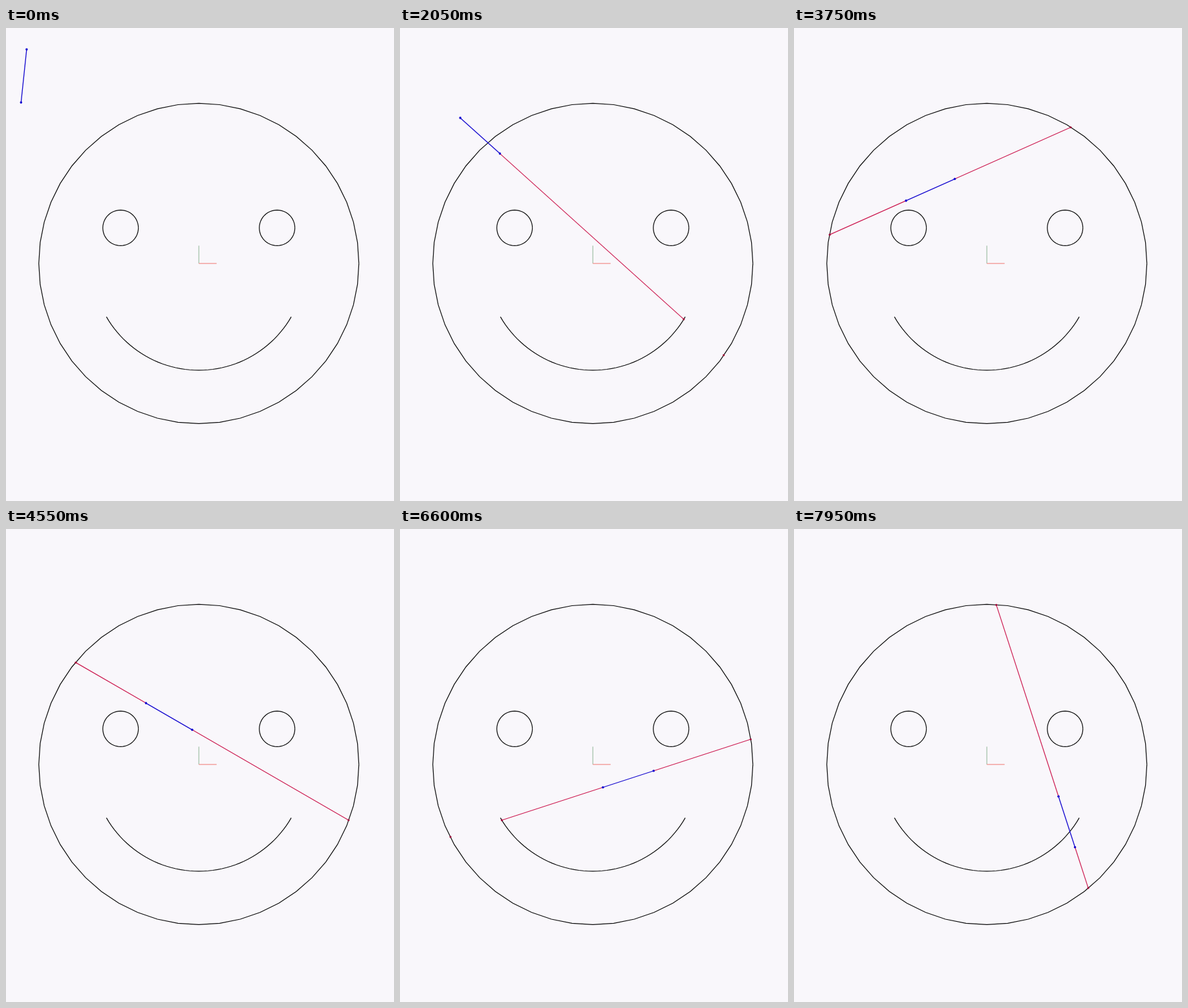
An HTML page with a canvas that plays this animation: 600 px wide and 731 px high, repeating every 8 s.

```html
<!DOCTYPE html>
<html lang="en">
<head>
<meta charset="utf-8">
<title>Line and face intersections</title>
<style>
  html, body { margin: 0; width: 100%; height: 100%; overflow: hidden; background: #f9f7fb; }
  canvas { display: block; }
</style>
</head>
<body>
<canvas id="stage" width="600" height="731"></canvas>
<script>
const ctx = document.getElementById('stage').getContext('2d');
const UNIT = 27.5, CX = 298.2, CY = 363.9;
const LOOP = 8000, TICK = 50, STEP = 91.1, DELAY = 0.57;
const BLACK = '#0a0a0a', BLUE = '#1408cf', RED = '#cc1a50', HIT = '#a00c3c';
const rad = deg => deg * Math.PI / 180;

// Polyline arc in units around the face centre, angles in degrees.
function arc(ux, uy, radius, from, to, parts) {
  return Array.from({ length: parts + 1 }, (_, i) => {
    const a = rad(from + (to - from) * i / parts);
    return [CX + UNIT * (ux + radius * Math.cos(a)), CY + UNIT * (uy + radius * Math.sin(a))];
  });
}

const shapes = [
  arc(0, 0, 9, 0, 360, 48),
  arc(-4.4, -2, 1, 0, 360, 48),
  arc(4.4, -2, 1, 0, 360, 48),
  arc(0, 0, 6, 30, 150, 48)
];

function stroke(points, color, width) {
  ctx.beginPath();
  points.forEach(([x, y]) => ctx.lineTo(x, y));
  ctx.strokeStyle = color;
  ctx.lineWidth = width;
  ctx.stroke();
}

function dot([x, y], color, radius) {
  ctx.beginPath();
  ctx.arc(x, y, radius, 0, 2 * Math.PI);
  ctx.fillStyle = color;
  ctx.fill();
}

// Sorted distances along a ray at which it meets the shapes.
function castRay([ox, oy], [dx, dy]) {
  const hits = [];
  for (const shape of shapes) {
    for (let i = 1; i < shape.length; i++) {
      const [ax, ay] = shape[i - 1];
      const ex = shape[i][0] - ax, ey = shape[i][1] - ay;
      const det = dx * ey - dy * ex;
      if (!det) continue;
      const s = ((ax - ox) * ey - (ay - oy) * ex) / det;
      const u = ((ax - ox) * dy - (ay - oy) * dx) / det;
      if (s > 0 && u >= 0 && u < 1) hits.push(s);
    }
  }
  return hits.sort((a, b) => a - b);
}

function draw(time) {
  const t = Math.floor(time % LOOP / TICK) * TICK;
  const n = Math.max(0, Math.floor(t / STEP - DELAY));
  const mid = [27.6 + UNIT / 6 * n, 74.1 + 0.16 * UNIT * n];
  const angle = rad(96 + 6 * n);
  const dir = [Math.cos(angle), Math.sin(angle)];
  const along = (p, d, s) => [p[0] + d[0] * s, p[1] + d[1] * s];

  ctx.fillStyle = '#f9f7fb';
  ctx.fillRect(0, 0, 600, 731);
  stroke([[CX, CY], [CX, CY - UNIT]], '#8fb596', 1);
  stroke([[CX, CY], [CX + UNIT, CY]], '#f0807c', 1.1);
  shapes.forEach(shape => stroke(shape, BLACK, 1.2));

  const rays = [-1, 1].map(sign => {
    const out = dir.map(v => v * sign);
    const end = along(mid, out, 1.5 * UNIT);
    return { end, hits: castRay(end, out).map(s => along(end, out, s)) };
  });
  rays.forEach(({ end, hits }) => hits.length && stroke([end, hits[0]], RED, 1.2));
  stroke(rays.map(r => r.end), BLUE, 1.3);
  rays.forEach(({ end, hits }) => {
    hits.forEach(p => dot(p, HIT, 1.6));
    dot(end, BLUE, 1.8);
  });
}

const start = performance.now();
function frame() {
  draw(performance.now() - start);
  requestAnimationFrame(frame);
}
frame();
</script>
</body>
</html>
```
